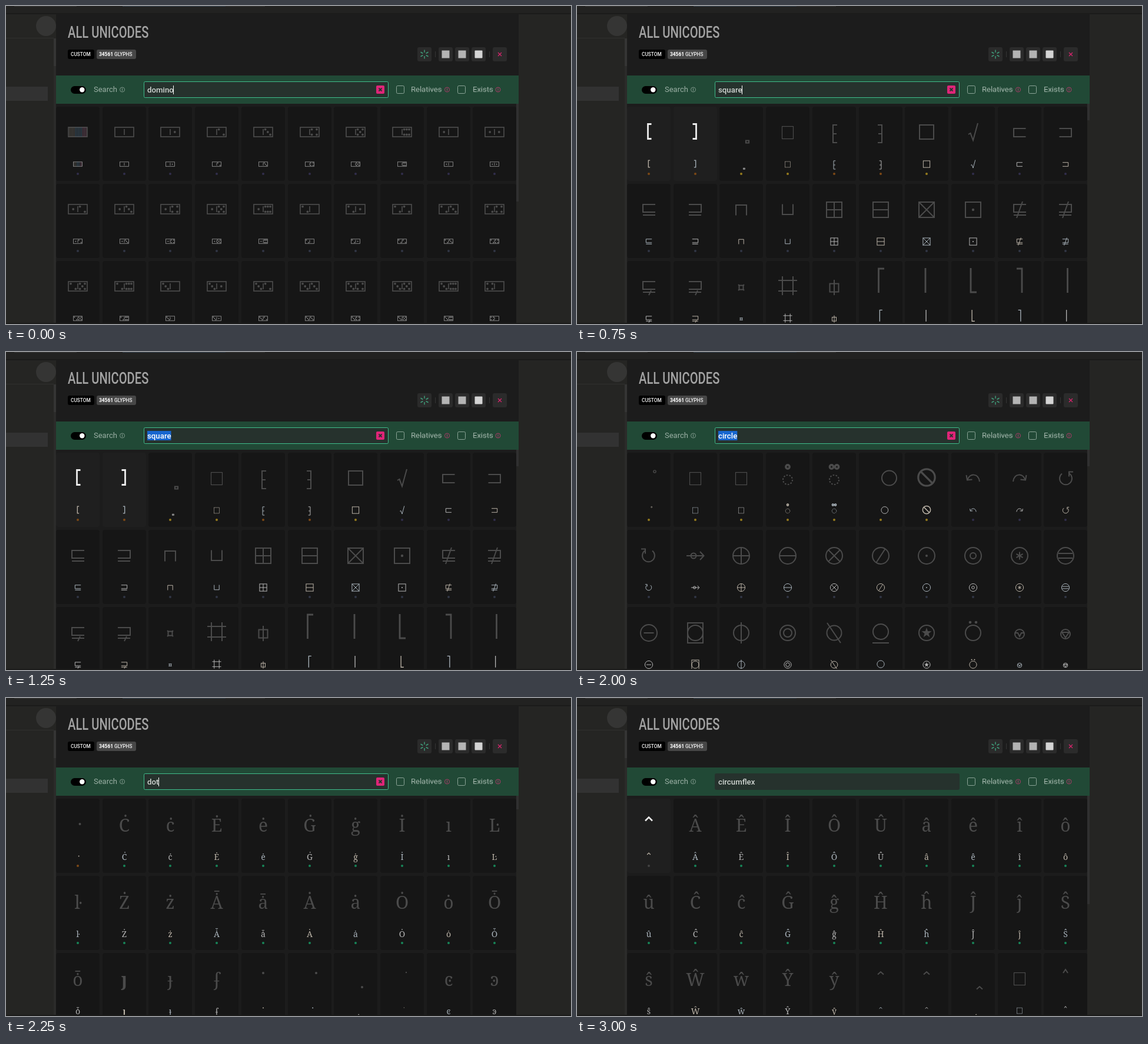
Animation of 960 by 540 pixels, one loop 3.5 s. Source, as an HTML page:

```html
<!DOCTYPE html>
<html lang="en">
<head>
<meta charset="utf-8">
<title>All Unicodes</title>
<style>
  html, body { margin: 0; width: 100%; height: 100%; overflow: hidden; background: #252523; }
  svg { display: block; width: 960px; height: 540px; font-family: Roboto, sans-serif; }
  .ink { fill: none; stroke: currentColor; }
  .ink text { fill: currentColor; stroke: none; font: 200 30px "Noto Serif", serif; text-anchor: middle; }
  .ink .solid { fill: currentColor; stroke: none; }
  .bar { font-size: 13px; fill: #9bb0a5; }
  .badge { font-size: 8.3px; font-weight: 500; fill: #f2f2f2; }
  #query { font-size: 13.25px; font-weight: 500; fill: #d0d5d2; }
</style>
</head>
<body>
<svg id="stage" viewBox="0 0 960 540"></svg>
<script>
const stage = document.getElementById('stage');

// drawing helpers
const rect = (x, y, w, h, fill, r = 0, more = '') =>
  `<rect x="${x}" y="${y}" width="${w}" height="${h}" rx="${r}" fill="${fill}" ${more}/>`;
const path = (d, more = '') => `<path d="${d}" ${more}/>`;
const ring = (r, x = 0, y = 0, more = '') => `<circle cx="${x}" cy="${y}" r="${r}" ${more}/>`;
const dot = (x, y, r = 2) => ring(r, x, y, 'class="solid"');
const box = (w, h, x = 0, y = 0, more = '') => rect(x - w, y - h, 2 * w, 2 * h, 'none', 0, more);
const flip = s => `<g transform="scale(-1 1)">${s}</g>`;
const letter = (ch, more = '') => `<text y="11.8" ${more}>${ch}</text>`;
const label = (x, y, s, more) => `<text x="${x}" y="${y}" ${more}>${s}</text>`;
const hat = (x, y, w = 5, h = 4.5) =>
  path(`M${x - w} ${y + h}L${x} ${y}L${x + w} ${y + h}`);
const missing = box(9.5, 10.5, 0, 0, 'stroke-width="1.2"');
const range = n => [...Array(n).keys()];

// dominoes
function pips(n, cx) {
  const spots = [];
  if (n % 2) spots.push([0, 0]);
  if (n > 1) spots.push([-1, -1], [1, 1]);
  if (n > 3) spots.push([1, -1], [-1, 1]);
  if (n > 5) spots.push([0, -1], [0, 1]);
  return spots.map(([x, y]) => dot(cx + x * 4.2, y * 4.4, 1.9)).join('');
}
function domino(i) {
  let inside;
  if (i === 0) {
    inside = range(12).map(k => path(`M${k * 2.5 - 13.7} -8V8`,
      `stroke-width="1.1" stroke="${k < 4 ? '#5b5751' : k < 9 ? '#40586a' : '#6a4a5c'}"`)).join('');
  } else {
    const n = i - 1;
    inside = path('M0 -5V5') + pips(Math.floor(n / 7), -7.8) + pips(n % 7, 7.8);
  }
  return `<g transform="translate(0 -1)" stroke-width="1.7">${box(16, 8)}${inside}</g>`;
}

// squares
const bracket = path('M4.5 -14.5H-1.5V10.5H4.5', 'stroke-width="2.8"');
const quill = path('M5 -13H-2V17H5M-2 2H4');
const cup = path('M10.5 -7H-10V7H10.5');
const cupLine = path('M11 -9H-10V4H11M-10 9H11');
const slash = path('M5 -14L-5 14');
const tick = path('M4 6L0 14');
const frame = box(13, 13);
const tall = d => path(d, 'stroke-width="2.8"');
const squares = [
  bracket, flip(bracket), box(2.6, 2, 10.5, 15.5), missing, quill, flip(quill),
  box(12, 12, 0, -1), path('M-8 3L-4.5 1L0 13L8 -16'), cup, flip(cup),
  cupLine, flip(cupLine), path('M-9 9.5V-8H9V9.5'), path('M-9 -9.5V8H9V-9.5'),
  frame + path('M0 -13V13M-13 0H13'), frame + path('M-13 0H13'),
  frame + path('M-13 -13L13 13M13 -13L-13 13'), frame + dot(0, 0, 2.2),
  cupLine + slash, flip(cupLine) + slash,
  cupLine + tick, flip(cupLine) + tick,
  box(3.5, 3.5, 0, 1) + path('M-5 -4L-3 -2M5 -4L3 -2M-5 6L-3 4M5 6L3 4'),
  path('M-9 -18V14M9 -18V14M-16 -11H16M-16 7H16'),
  box(7.5, 7, 0, 1.5) + path('M0 -12V14'),
  tall('M6 -31H-3.5V10'), tall('M-2 -32V10'), tall('M-4 -32V9H6'), tall('M-5 -31H4V10'), tall('M3.5 -32V10')
];

// circles
const dotted = ring(8, 0, 2, 'stroke-dasharray="2.6 2.4"');
const halo = x => ring(3.2, x, -20, 'stroke-width="3.4"');
const arch = path('M11 5C9 -10 -6 -9 -9 1M-11.5 -6L-10 2.5L-1.5 1.5');
const turn = path('M-6 -8.5A10.5 10.5 0 1 0 7 -8.5M13 -11.5H6V-3.5');
const big = ring(14);
const mid = ring(13);
const star = range(10).map(k => {
  const a = k * Math.PI / 5, r = k % 2 ? 3.6 : 9;
  return `${(r * Math.sin(a)).toFixed(1)},${(-r * Math.cos(a)).toFixed(1)}`;
}).join(' ');
const circles = [
  ring(2.1, 10, -12, 'stroke-width="1.4"'), missing, missing, halo(0) + dotted, halo(-4.5) + halo(4.5) + dotted,
  ring(12.5, 14.5, -1), `<g stroke-width="3.2">${ring(14.2, 0, -2)}${path('M-10 -12L10 8')}</g>`,
  arch, flip(arch), turn,
  flip(turn), path('M-15 0H14M8 -7L14.5 0L8 7') + ring(4.5, -3, 0),
  big + path('M0 -14V14M-14 0H14'), big + path('M-14 0H14'),
  big + path('M-10 -10L10 10M10 -10L-10 10'), big + path('M7.5 -11.5L-7.5 11.5'),
  big + dot(0, 0), big + ring(5),
  big + path('M0 -6.5V6.5M-5.6 -3.2L5.6 3.2M-5.6 3.2L5.6 -3.2'), big + path('M-12 -4H12M-12 4H12'),
  big + path('M-8.5 0H8.5'), box(13, 17) + mid, mid + path('M0 -18V18'), mid + ring(7),
  ring(12.5) + path('M-12 -17L11 17'), ring(13, 0, -2) + path('M-14 17H14'),
  mid + `<polygon class="solid" points="${star}"/>`, mid + dot(-5, -18, 2.3) + dot(5, -18, 2.3),
  ring(8, 0, 2) + path('M-7 0H-3L0 6L3 0H7'), ring(8, 0, 2) + path('M-6 -1H6L0 8Z')
];

// accented letters
const dots = [
  dot(3.5, -1), ...[...'ĊċĖėĠġİıĿŀŻżǠǡȦȧȮȯȰȱ'].map(ch => letter(ch)),
  letter('ȷ', 'style="font-weight:700"'), letter('ɟ'), letter('ʄ'),
  dot(0, -10), dot(11, -10), dot(11, 14), dot(7, -11, 1.2), letter('ͼ'), letter('ͽ')
];
const hats = [
  path('M-6 -6.5L0 -12.5L6 -6.5', 'stroke-width="2.6"'),
  ...[...'ÂÊÎÔÛâêîôûĈĉĜĝĤĥĴĵŜŝŴŵŶŷ'].map(ch => letter(ch)),
  hat(0, -12), hat(0, -12), hat(11, 13), missing, hat(0, -16, 4, 6)
];

const ORANGE = '#7c4815', YELLOW = '#947a1d', GREEN = '#178558', VIOLET = '#312e4b', SLATE = '#313645';
const rest = i => i < 10 ? VIOLET : SLATE;
const screens = [
  { word: 'domino', thumb: 166, glyphs: range(30).map(domino), known: 0, tint: rest, small: '#9a9a9a' },
  { word: 'square', thumb: 28, glyphs: squares, known: 2,
    tint: i => [0, 1, 4, 5].includes(i) ? ORANGE : i < 7 ? YELLOW : rest(i) },
  { word: 'circle', thumb: 28, glyphs: circles, known: 0, tint: i => i < 7 ? YELLOW : rest(i) },
  { word: 'dot', thumb: 23, glyphs: dots, known: 0, tint: i => i ? GREEN : ORANGE },
  { word: 'circumflex', thumb: 184, glyphs: hats, known: 1, tint: i => i ? GREEN : '#434343' }
];

function cell(s, i) {
  const x = Math.round(85 + (i % 10) * 78.71), y = 171 + Math.floor(i / 10) * 131;
  const cx = x + 37, known = i < s.known;
  const ink = (cy, size, color, weight) =>
    `<g class="ink" transform="translate(${cx} ${cy}) scale(${size})" color="${color}" stroke-width="${weight}">${s.glyphs[i]}</g>`;
  return rect(x, y, 74, 126, known ? '#1f1f1f' : '#161616', 4)
    + ink(y + 44, 1, known ? '#ececec' : '#4b4b4b', 2)
    + ink(y + 98, .47, s.small || ['#bcb4a8', '#aab4bc', '#b6b6b6'][i % 3], 2.1)
    + ring(2, cx, y + 114, `fill="${s.tint(i)}"`);
}
const grid = s => `<g class="grid">${range(30).map(i => cell(s, i)).join('')}
  ${rect(867, 166, 4, 374, '#252523')}${rect(867, 166, 4, s.thumb, '#303030')}</g>`;

const info = (x, color) =>
  `<g fill="none" stroke="${color}">${ring(4, x, 142)}${path(`M${x} 139.5V144.5`)}</g>`;
const option = (x, tx, name, end) =>
  rect(x, 135.5, 13, 13, 'none', 2, 'stroke="#8ba497"')
  + label(tx, 146, name, 'class="bar"')
  + path(`M${tx} 142.5H${end}`, 'stroke="#9bb0a5" stroke-opacity=".4"')
  + info(end + 8.5, '#a83a66');
const button = x => rect(x, 70, 24, 24, '#2b2b2b', 3);
const cross = (x, y, r, color, w) =>
  path(`M${x - r} ${y - r}L${x + r} ${y + r}M${x + r} ${y - r}L${x - r} ${y + r}`,
    `stroke="${color}" stroke-width="${w}"`);
const rays = range(6).map(k =>
  path('M0 -3V-7.5', `transform="translate(711 82) rotate(${k * 60})" stroke="#3f9b79" stroke-width="1.5"`)).join('');

stage.innerHTML =
  // page behind the panel
  rect(0, 0, 960, 540, '#252523') + rect(0, 0, 960, 12, '#222221')
  + rect(14, 0, 106, 1, '#373736') + rect(198, 0, 175, 1, '#35414c') + rect(373, 0, 67, 1, '#373736')
  + rect(0, 12, 960, 2, '#1b1b1a')
  + rect(0, 54, 81, 1, '#30302f') + rect(81, 55, 4, 485, '#2b2b2a') + rect(81, 55, 4, 47, '#353534')
  + rect(0, 137, 71, 24, '#323232') + ring(17, 68, 34, 'fill="#353534"')
  // panel header
  + rect(85, 13, 786, 527, '#1c1c1c')
  + label(0, 0, 'ALL UNICODES',
    'transform="translate(105 54) scale(.737 1)" font-size="27.4" font-weight="500" fill="#a3a3a3"')
  + rect(105, 74, 45, 16, '#000', 3) + label(110, 85, 'CUSTOM', 'class="badge"')
  + rect(154, 74, 67, 16, '#474747', 3)
  + label(158, 85, '<tspan font-weight="900">34561</tspan> GLYPHS', 'class="badge"')
  + [699, 735, 763, 791, 827].map(button).join('') + rays
  + rect(729, 77, 1, 10, '#343434') + rect(821, 77, 1, 10, '#343434')
  + rect(740.5, 75.5, 13, 13, '#b4b4b4') + rect(768.5, 75.5, 13, 13, '#b4b4b4')
  + rect(796.5, 75.5, 13, 13, '#d4d4d4', 1) + cross(839, 82, 3, '#d8246d', 1.3)
  // results
  + screens.map(grid).join('')
  // search bar
  + rect(85, 118, 786, 48, '#214936')
  + rect(110, 136, 26, 13, '#000', 6.5) + ring(4.2, 129.3, 142.3, 'fill="#fff"')
  + label(149, 146, 'Search', 'class="bar"') + info(197.5, '#7d978a')
  + rect(234.5, 128.5, 415, 27, '#26322d', 2, 'id="field"')
  + rect(240, 134, 0, 16, '#1766cf', 0, 'id="mark"')
  + label(240, 147, '', 'id="query"') + rect(0, 135, 1, 15, '#fff', 0, 'id="caret"')
  + `<g id="clear">${rect(629, 135, 14, 14, '#df2578', 2)}${cross(636, 142, 2.5, '#26322d', 1.8)}</g>`
  + option(663.5, 688, 'Relatives', 741) + option(767.5, 793, 'Exists', 827.5)
  + rect(0, 538, 960, 2, '#1b1b1a');

// start time, screen, field state
const LOOP = 3500;
const steps = [
  [0, 0, 'typed'], [500, 0, 'selected'], [750, 1, 'typed'], [1250, 1, 'selected'],
  [1500, 2, 'typed'], [2000, 2, 'selected'], [2250, 3, 'typed'], [2750, 3, 'selected'],
  [3000, 4, 'blurred']
];
const [field, mark, query, caret, clear] =
  ['field', 'mark', 'query', 'caret', 'clear'].map(id => document.getElementById(id));
const grids = [...document.querySelectorAll('.grid')];
const show = (el, on) => { el.style.display = on ? '' : 'none'; };

function render([, index, state]) {
  grids.forEach((g, i) => show(g, i === index));
  query.textContent = screens[index].word;
  query.style.fill = state === 'selected' ? '#fff' : '';
  const width = query.getComputedTextLength();
  mark.setAttribute('width', width);
  caret.setAttribute('x', 240 + Math.floor(width));
  show(mark, state === 'selected');
  show(caret, state === 'typed');
  show(clear, state !== 'blurred');
  field.setAttribute('stroke', state === 'blurred' ? '#26322d' : '#40bd8c');
}

const origin = performance.now();
let current;
function play(now) {
  const t = Math.max(0, now - origin) % LOOP;
  const step = steps.filter(s => s[0] <= t).pop();
  if (step !== current) render(current = step);
  requestAnimationFrame(play);
}
play(origin);
</script>
</body>
</html>
```
